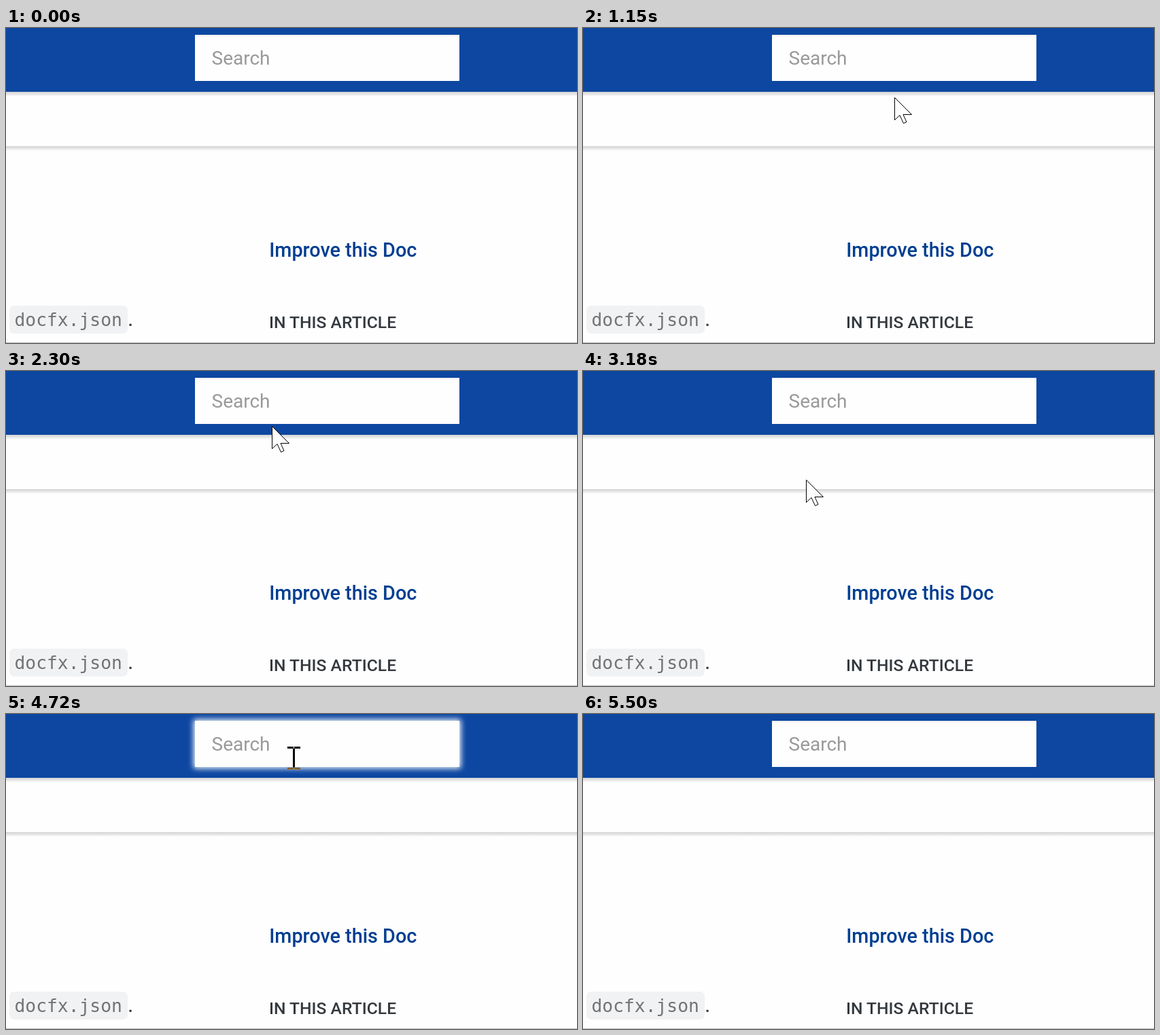
Animation of 840x464 px, one loop 6.82 s. Source, as an HTML page:

```html
<!DOCTYPE html>
<html lang="en">
<head>
<meta charset="utf-8">
<title>Search box hover</title>
<style>
html, body { margin: 0; width: 100%; height: 100%; overflow: hidden; background: #fefefe; }
svg { display: block; width: 840px; height: 464px; }
text { font-family: Roboto, sans-serif; white-space: pre; }
.medium { font-weight: 500; }
.code { font-family: "DejaVu Sans Mono", "Noto Sans Mono", monospace; }
#ibeam { fill: #fff; mix-blend-mode: difference; }
#arrow, #hand { fill: #fff; stroke: #000; }
</style>
</head>
<body>
<svg viewBox="0 0 840 464">
  <defs>
    <linearGradient id="shade" x1="0" y1="0" x2="0" y2="1">
      <stop offset="0" stop-opacity=".17"/>
      <stop offset=".4" stop-opacity=".11"/>
      <stop offset="1" stop-opacity="0"/>
    </linearGradient>
    <filter id="blur" x="-10%" y="-40%" width="120%" height="180%">
      <feGaussianBlur stdDeviation="4"/>
    </filter>
    <clipPath id="bar"><rect width="840" height="94"/></clipPath>
  </defs>

  <rect width="840" height="464" fill="#fefefe"/>
  <rect width="840" height="94" fill="#0d47a1"/>
  <rect y="94" width="840" height="7" fill="url(#shade)"/>
  <rect y="174" width="840" height="7" fill="url(#shade)"/>

  <g clip-path="url(#bar)">
    <rect id="glow" x="276" y="8" width="393" height="72" fill="#fff" filter="url(#blur)"/>
  </g>
  <rect x="278" y="10" width="389" height="68" fill="#fefefe"/>
  <rect id="inset" x="278" y="10" width="389" height="3" fill="url(#shade)" opacity=".5"/>
  <text x="302.5" y="54" font-size="28" fill="#999">Search</text>

  <text id="link" class="medium" x="387.2" y="337" font-size="28.8">Improve this Doc</text>
  <text class="medium" x="387" y="442" font-size="24.7" fill="#34393e">IN THIS ARTICLE</text>

  <rect x="5" y="409" width="174" height="41" rx="7" fill="#f1f2f3"/>
  <text class="code" x="12.5" y="439" font-size="26.3" fill="#717374">docfx.json</text>
  <text x="179" y="439" font-size="32" fill="#34393e">.</text>
  <rect y="463" width="840" height="1" fill="#bdbdbd"/>

  <path id="arrow" d="M0 0V33L7.5 26 13 38 17.5 36 12.5 25H25Z"/>
  <path id="hand" d="M-3 2Q0 -2 3 2V13Q6 10 9 14Q12 11 15 15Q19 13 20 18V26L16 33V37H-1V33L-10 21Q-10 15 -3 20Z"/>
  <path id="ibeam" d="M-10-17h9v3h-9zM0-17h9v3h-9zM-2-14h3v28h-3zM-10 14h9v3h-9zM0 14h9v3h-9z"/>
</svg>
<script>
const LOOP = 6820;
const ORIGIN = { x: 668, y: 500 };

// Each move runs from the previous place to x, y in a number of hard steps
const moves = [
  { start: 460, end: 690, steps: 4, x: 515, y: 237 },
  { start: 760, end: 1070, steps: 5, x: 461, y: 116 },
  { start: 1150, end: 1380, steps: 4, x: 447, y: 59 },
  { start: 2160, end: 2300, steps: 3, x: 391, y: 81 },
  { start: 2400, end: 2630, steps: 4, x: 314, y: 174 },
  { start: 3180, end: 3720, steps: 8, x: 422, y: 60 },
  { start: 4720, end: 5340, steps: 9, x: 612, y: 430, power: 2 },
  { start: 5430, end: 5500, steps: 2, x: 696, y: 474 }
];

const field = { left: 278, top: 10, right: 667, bottom: 78 };
const linkBox = { left: 388, top: 300, right: 605, bottom: 355 };

const el = id => document.getElementById(id);
const glow = el("glow"), inset = el("inset"), link = el("link");
const pointers = ["arrow", "hand", "ibeam"].map(el);

const show = (node, on) => node.setAttribute("visibility", on ? "visible" : "hidden");
const inside = (b, p) => p.x >= b.left && p.x <= b.right && p.y >= b.top && p.y <= b.bottom;
const mix = (a, b, f) => Math.round(a + (b - a) * f);

function locate(t) {
  let place = ORIGIN;
  for (const { start, end, steps, x, y, power = 1 } of moves) {
    if (t < start) break;
    const gap = (end - start) / (steps - 1);
    const done = Math.min(steps, 1 + Math.floor((t - start) / gap + 0.05));
    const f = (done / steps) ** power;
    place = { x: mix(place.x, x, f), y: mix(place.y, y, f) };
  }
  return place;
}

function draw(t) {
  const place = locate(t);
  const onField = inside(field, place);
  const onLink = inside(linkBox, place);
  const kind = onField ? "ibeam" : onLink ? "hand" : "arrow";
  const shift = onField ? 0 : 0.5;

  show(glow, onField);
  show(inset, !onField);
  link.setAttribute("fill", onLink ? "#23527c" : "#003e91");
  for (const p of pointers) {
    show(p, p.id === kind);
    p.setAttribute("transform", `translate(${place.x + shift} ${place.y + shift})`);
  }
}

function tick() {
  draw(performance.now() % LOOP);
  requestAnimationFrame(tick);
}
tick();
</script>
</body>
</html>
```
